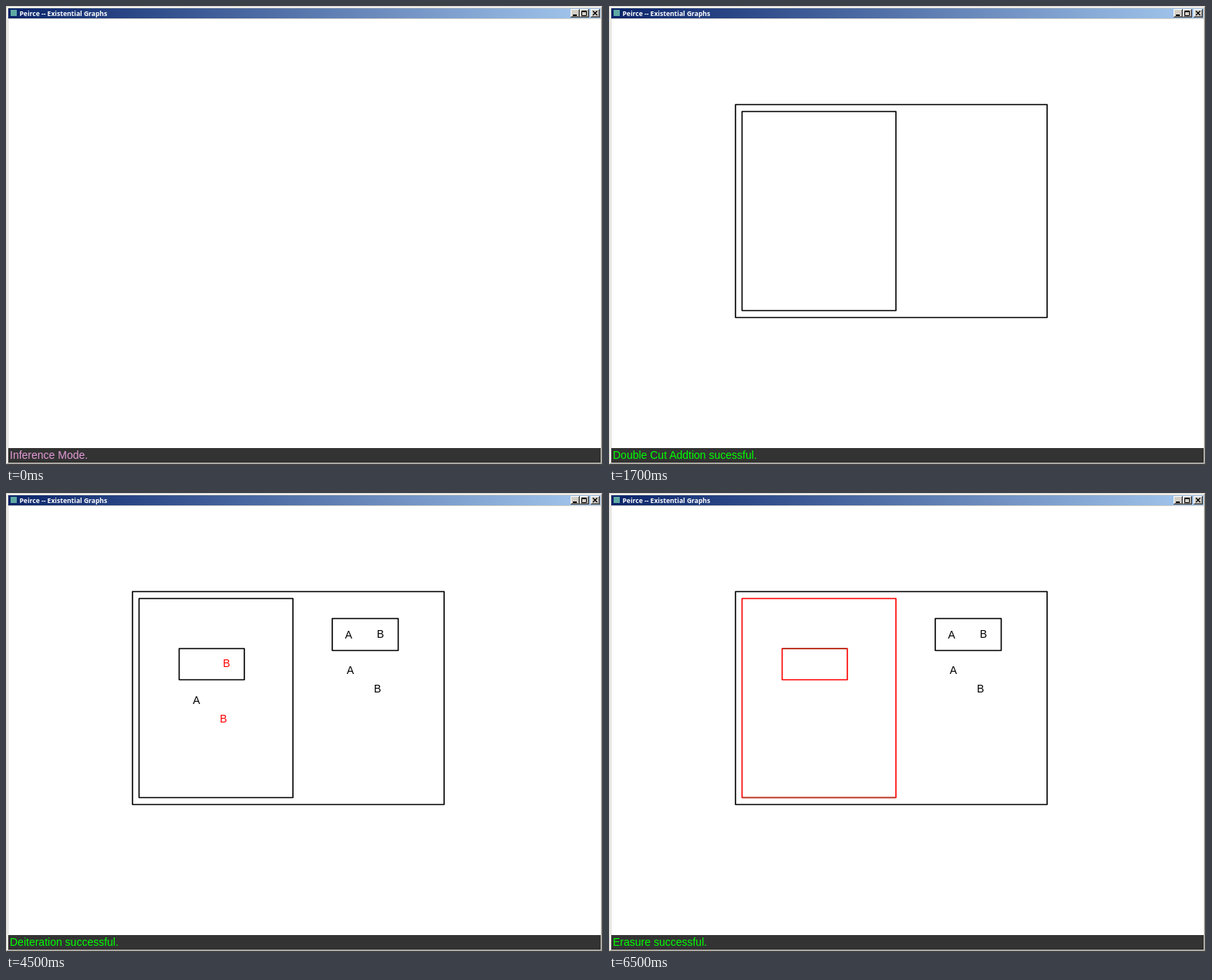
Write an HTML page that moves like this. It is 774 px wide and 596 px high and loops after 8000 ms.

```html
<!DOCTYPE html>
<html lang="en">
<head>
<meta charset="utf-8">
<title>Existential graph proof</title>
<style>
  html, body { margin: 0; width: 100%; height: 100%; overflow: hidden; background: #d4d0c8; }
  svg { display: block; width: 774px; height: 596px; }
  .title { font: bold 8.55px "Open Sans", "Noto Sans", sans-serif; fill: #fff; }
  .status, .letter { font: 14px "Liberation Sans", Arial, sans-serif; }
  .letter { text-anchor: middle; }
  .cut { fill: none; stroke-width: 1.6; stroke-linejoin: round; }
</style>
</head>
<body>
<svg viewBox="0 0 774 596">
  <defs>
    <linearGradient id="bar">
      <stop offset="0" stop-color="#0a246a"/>
      <stop offset="1" stop-color="#a6caf0"/>
    </linearGradient>
    <g id="button">
      <path fill="#404040" d="M0 0h12v11H0z"/>
      <path fill="#fff" d="M0 0h11v10H0z"/>
      <path fill="#808080" d="M1 1h10v9H1z"/>
      <path fill="#d4d0c8" d="M1 1h9v8H1z"/>
    </g>
  </defs>

  <!-- window frame -->
  <path fill="#404040" d="M0 0h774v596H0z"/>
  <path fill="#d4d0c8" d="M0 0h773v595H0z"/>
  <path fill="#808080" d="M1 1h772v594H1z"/>
  <path fill="#fff" d="M1 1h771v593H1z"/>
  <path fill="#d4d0c8" d="M2 2h770v592H2z"/>
  <path fill="url(#bar)" d="M3 3h768v13H3z"/>
  <rect x="6" y="5" width="8" height="8" fill="#5fa9a5"/>
  <text class="title" x="17.5" y="12.7">Peirce -- Existential Graphs</text>
  <use href="#button" x="732" y="4"/>
  <use href="#button" x="744" y="4"/>
  <use href="#button" x="758" y="4"/>
  <path d="M735 11h5v2h-5z"/>
  <path fill="none" stroke="#000" d="M746.5 6.5h6v6h-6zM746 7.5h7"/>
  <path fill="none" stroke="#000" stroke-width="1.4" d="M761 6.5l5.5 5.5M766.500 6.500l-5.500 5.500"/>

  <path fill="#fff" d="M3 17h768v557H3z"/>
  <path fill="#333" d="M3 574h768v19H3z"/>
  <g id="graph"></g>
  <text id="status" class="status" x="5" y="587.5"></text>
</svg>
<script>
const LOOP = 8000;
const BLACK = "#000", RED = "#f00", DULL = "#a83a22", GREEN = "#0f0", PINK = "#e39ad6";
const graph = document.getElementById("graph");
const status = document.getElementById("status");

// Corners are left, top, right, bottom.
const cut = (x, y, r, b, color = BLACK) =>
  `<path class="cut" stroke="${color}" d="M${x} ${y}H${r}V${b}H${x}Z"/>`;
const edge = (x, y, r) =>
  `<path class="cut" stroke="${DULL}" d="M${x} ${y}H${r}"/>`;
const letter = (char, x, y, color = BLACK) =>
  `<text class="letter" x="${x}" y="${y}" fill="${color}">${char}</text>`;

const outer = cut(164, 128, 568, 404.5);
const left = color => cut(172.5, 137, 372, 395.5, color);
const leftBox = color => cut(224.5, 202, 309, 242.5, color);
const leftRings = cut(197.5, 181, 343, 330.5) + cut(210, 190.5, 325, 311);
const rightRings = cut(397, 142.5, 542.5, 292.5) + cut(409, 152.5, 524.5, 272.5);
const leftB = color => letter("B", 285.8, 226, color) + letter("B", 282, 297.5, color);
const leftA = letter("A", 247, 273.5);
const rightTerms = cut(423, 163, 508.5, 204.5) +
  letter("A", 444.2, 189) + letter("B", 485.3, 187.5) +
  letter("A", 446.3, 235) + letter("B", 481.6, 258.5);

const steps = [
  { at: 0, text: "Inference Mode.", color: PINK, art: "" },
  { at: 500, text: "Double Cut Addtion sucessful.", color: GREEN, art: outer + left() },
  { at: 2500, text: "Iteration successful.", color: GREEN,
    art: outer + left() + leftRings + leftBox() + letter("A", 244.6, 228) +
      leftA + leftB() + rightRings + rightTerms },
  { at: 4500, text: "Deiteration successful.", color: GREEN,
    art: outer + left() + leftBox() + leftA + leftB(RED) + rightTerms },
  { at: 6500, text: "Erasure successful.", color: GREEN,
    art: outer + left(RED) + leftBox(RED) + edge(173, 395.5, 371.5) +
      edge(225, 202, 308.5) + rightTerms }
];

let shown;
function draw(time) {
  const step = steps.findLast(s => s.at <= time % LOOP);
  if (step === shown) return;
  shown = step;
  graph.innerHTML = step.art;
  status.textContent = step.text;
  status.setAttribute("fill", step.color);
}

const start = performance.now();
function tick() {
  draw(performance.now() - start);
  requestAnimationFrame(tick);
}
tick();
</script>
</body>
</html>
```
